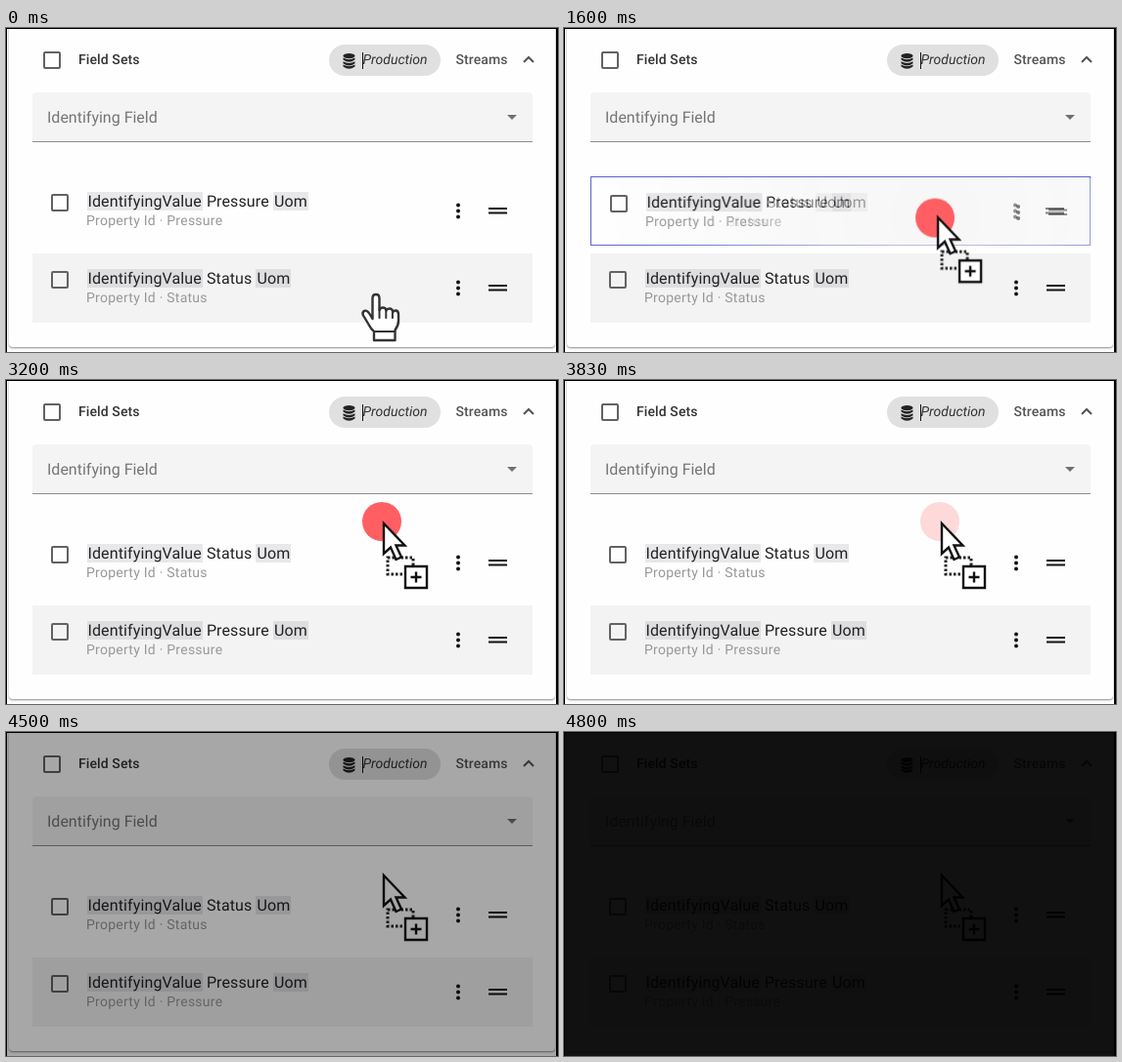
Recreate the animation shown at these times as an HTML page. Size 564 px wide and 332 px high, loop 5.33 s.

```html
<!DOCTYPE html>
<html lang="en">
<head>
<meta charset="utf-8">
<title>Reordering field sets by drag and drop</title>
<style>
  html, body { margin: 0; width: 100%; height: 100%; overflow: hidden; background: #fdfdfd; }
  #stage {
    position: absolute; left: 0; top: 0; width: 564px; height: 332px; overflow: hidden;
    background: #fdfdfd; color: #222; font-family: Roboto, sans-serif;
    text-rendering: geometricPrecision;
  }
  #stage * { box-sizing: border-box; }
  #stage div, #stage span, #stage svg, #stage p, #stage small, #stage i { position: absolute; margin: 0; white-space: pre; }
  svg { overflow: visible; }

  .edge { inset: 0; border: solid #000; border-width: 1px 2px 0 1px; }
  .card { left: 3px; top: -10px; width: 558px; height: 337px; border-radius: 4px; background: #fefefe; box-shadow: 0 1px 2px rgba(0,0,0,.45); }

  .box { width: 18px; height: 18px; border: 2px solid #626262; border-radius: 2px; }
  .label { top: 25px; font: 500 14px/16px Roboto, sans-serif; letter-spacing: .1px; }
  .pill { left: 330px; top: 17px; width: 114px; height: 32px; border-radius: 16px; background: #e0e0e0; }
  .pill span { left: 34.5px; top: 8px; font: italic 14px/16px Roboto, sans-serif; color: #333; }
  .caret { left: 34px; top: 8px; width: 1px; height: 17px; background: #111; }
  .field { left: 27px; top: 66px; width: 511px; height: 51px; border-radius: 4px 4px 0 0; background: #f4f4f4; border-bottom: 1px solid #8c8c8c; }
  .field span { left: 15px; top: 16px; font-size: 16px; line-height: 20px; color: #757575; }

  .list { left: 27px; top: 152px; width: 511px; height: 150px; }
  .row { left: 0; top: 0; width: 511px; height: 71px; background: #fefefe; border: 0 solid #5a62cc; }
  .row + .row { top: 79px; }
  .row + .row, .ghost { background: #f3f3f3; }
  .row .box { left: 19px; top: 18px; }
  .row p { left: 55.5px; top: 16px; font-size: 16px; line-height: 20px; letter-spacing: .12px; }
  .row mark { padding: 0 1px; color: inherit; background: rgba(40,40,70,.1); }
  .row small { left: 55px; top: 38px; font-size: 14px; line-height: 16px; letter-spacing: .25px; color: #989898; }
  .row svg { right: 26px; top: 50%; width: 53px; height: 15px; margin-top: -7.5px !important; }

  .ghost {
    left: 27px; top: 231px; opacity: 0;
    -webkit-mask-image: radial-gradient(circle at 350px 39px, rgba(0,0,0,.7), rgba(0,0,0,.5) 120px, rgba(0,0,0,.2) 240px, rgba(0,0,0,.03) 330px);
    mask-image: radial-gradient(circle at 350px 39px, rgba(0,0,0,.7), rgba(0,0,0,.5) 120px, rgba(0,0,0,.2) 240px, rgba(0,0,0,.03) 330px);
  }
  .press { left: -20px; top: -20px; width: 40px; height: 40px; border-radius: 50%; background: #ff5f63; opacity: 0; }
  .pointer, .hand { left: 0; top: 0; width: 1px; height: 1px; }
  .fade { inset: 0; background: #000; opacity: 0; }

  .hover, .after, .ghost, .press, .pointer, .hand, .fade { animation: 5330ms linear infinite; }
  .hover { animation-name: hover; animation-timing-function: step-end; }
  .after { animation-name: swap; animation-timing-function: step-end; }
  .hand { animation-name: hand; animation-timing-function: step-end; }
  .ghost { animation-name: ghost, ghost-move; animation-timing-function: step-end, linear; }
  .pointer { animation-name: pointer, pointer-move; animation-timing-function: step-end, linear; }
  .press { animation-name: press, press-move; }
  .fade { animation-name: fade; }

  @keyframes hover { 0%, 49.53%, 100% { border-width: 0; } 26.26% { border-width: 1px; } }
  @keyframes swap { 0% { opacity: 0; } 58.72% { opacity: .35; } 59.38% { opacity: .7; } 60.03%, 100% { opacity: 1; } }
  @keyframes hand { 0% { opacity: 1; } 16.13%, 100% { opacity: 0; } }
  @keyframes pointer { 0% { opacity: 0; } 16.13%, 100% { opacity: 1; } }
  @keyframes ghost {
    0% { opacity: 0; } 16.13% { opacity: 1; } 58.72% { opacity: .65; }
    59.38% { opacity: .3; } 60.03%, 100% { opacity: 0; }
  }
  @keyframes press {
    0%, 12.37% { opacity: 0; } 12.38%, 67.54% { opacity: 1; } 73.17%, 100% { opacity: 0; }
  }
  @keyframes fade {
    0%, 81.79% { opacity: 0; } 81.8% { opacity: .067; } 90.05%, 100% { opacity: .933; }
  }
  @keyframes ghost-move {
    0%, 16.13% { transform: translate(-1px, -2px); }
    20.63% { transform: translate(-1px, -29px); }
    25.51% { transform: translate(0, -59px); }
    36.21% { transform: translate(5px, -103px); }
    41.27% { transform: translate(7px, -110px); }
    44.27%, 48.5% { transform: translate(7px, -119px); }
    51.78%, 100% { transform: translate(7px, -126px); }
  }
  @keyframes pointer-move {
    0%, 16.13% { transform: translate(378px, 268px); }
    20.63% { transform: translate(377.5px, 239px); }
    25.51% { transform: translate(379px, 210px); }
    36.21% { transform: translate(384px, 168px); }
    41.27% { transform: translate(385px, 160.5px); }
    44.27%, 48.5% { transform: translate(385px, 152px); }
    51.78%, 100% { transform: translate(385px, 145px); }
  }
  @keyframes press-move {
    0%, 16.13% { transform: translate(376.5px, 270.5px); }
    20.63% { transform: translate(375.5px, 244.5px); }
    25.51% { transform: translate(377px, 214px); }
    36.21% { transform: translate(382px, 168px); }
    41.27% { transform: translate(384px, 161px); }
    44.27%, 48.5% { transform: translate(384px, 152px); }
    51.78%, 100% { transform: translate(384px, 145px); }
  }
</style>
</head>
<body>
<div id="stage">
  <svg width="0" height="0">
    <symbol id="grip" overflow="visible">
      <g fill="#111">
        <circle cx="3" cy="1.5" r="2"/><circle cx="3" cy="7.5" r="2"/><circle cx="3" cy="13.5" r="2"/>
        <path d="M34 4h19v2h-19zM34 8.5h19v2h-19z"/>
      </g>
    </symbol>
  </svg>

  <div class="card"></div>

  <i class="box" style="left:38px;top:24px"></i>
  <span class="label" style="left:74px;color:#333">Field Sets</span>
  <div class="pill">
    <svg style="left:14px;top:9px" width="13" height="15" fill="#222">
      <ellipse cx="6.5" cy="2.6" rx="6" ry="2.6"/>
      <path id="disc" d="M.5 4.6Q6.5 8 12.5 4.6V6.6Q6.5 11 .5 6.6z"/>
      <use href="#disc" y="3.7"/><use href="#disc" y="7"/>
    </svg>
    <span>Production</span>
    <div class="caret"></div>
  </div>
  <span class="label" style="left:459.5px;color:#555">Streams</span>
  <svg style="left:528px;top:28px" width="12" height="8" fill="none" stroke="#555" stroke-width="2"><path d="M1 7L6 2L11 7"/></svg>

  <div class="field">
    <span>Identifying Field</span>
    <svg style="left:485px;top:23px" width="10" height="5" fill="#707070"><path d="M0 0H10L5 5z"/></svg>
  </div>

  <div class="list">
    <div class="row hover"><i class="box"></i><p><mark>IdentifyingValue</mark> Pressure <mark>Uom</mark></p><small>Property Id · Pressure</small><svg><use href="#grip"/></svg></div>
    <div class="row"><i class="box"></i><p><mark>IdentifyingValue</mark> Status <mark>Uom</mark></p><small>Property Id · Status</small><svg><use href="#grip"/></svg></div>
  </div>
  <div class="list after">
    <div class="row"><i class="box"></i><p><mark>IdentifyingValue</mark> Status <mark>Uom</mark></p><small>Property Id · Status</small><svg><use href="#grip"/></svg></div>
    <div class="row"><i class="box"></i><p><mark>IdentifyingValue</mark> Pressure <mark>Uom</mark></p><small>Property Id · Pressure</small><svg><use href="#grip"/></svg></div>
  </div>

  <div class="row ghost"><i class="box"></i><p><mark>IdentifyingValue</mark> Status <mark>Uom</mark></p><small>Property Id · Status</small><svg><use href="#grip"/></svg></div>

  <div class="press"></div>

  <svg class="hand" fill="#fff" stroke="#333" stroke-width="2.4" stroke-linejoin="round" stroke-linecap="round">
    <path d="M374.5 298V277q0-4 3.5-4t3.5 4V289q1-2.500 3.500-2.500 3 0 3.500 3 1-2 3.300-2 3 0 3.500 3.500 1-1.500 2.700-1.500 3 0 3 4V300q0 5-3.500 9.500V320H376V311q-3-2.500-5-6.500l-6-10q-1.500-3.500 1.200-4.700 2.800-1 5.300 3.200z"/>
    <path d="M381.5 289v8M388.300 290v7M394.900 291v6M376 311H397.500" fill="none" stroke-width="2"/>
  </svg>

  <svg class="pointer">
    <path d="M5 37H31V54H5z" fill="none" stroke="#222" stroke-width="3" stroke-dasharray="2.500 2"/>
    <path d="M1 2V33L8 26.500L13.500 39L19 36.500L13.500 24.500H22.500z" fill="#fff" stroke="#111" stroke-width="2.400"/>
    <path d="M23 46H45V68H23z" fill="#fff" stroke="#111" stroke-width="2.400"/>
    <path d="M34 51.500V62.500M28.500 57H39.500" stroke="#111" stroke-width="2.400"/>
  </svg>

  <div class="edge"></div>
  <div class="fade"></div>
</div>
</body>
</html>
```
